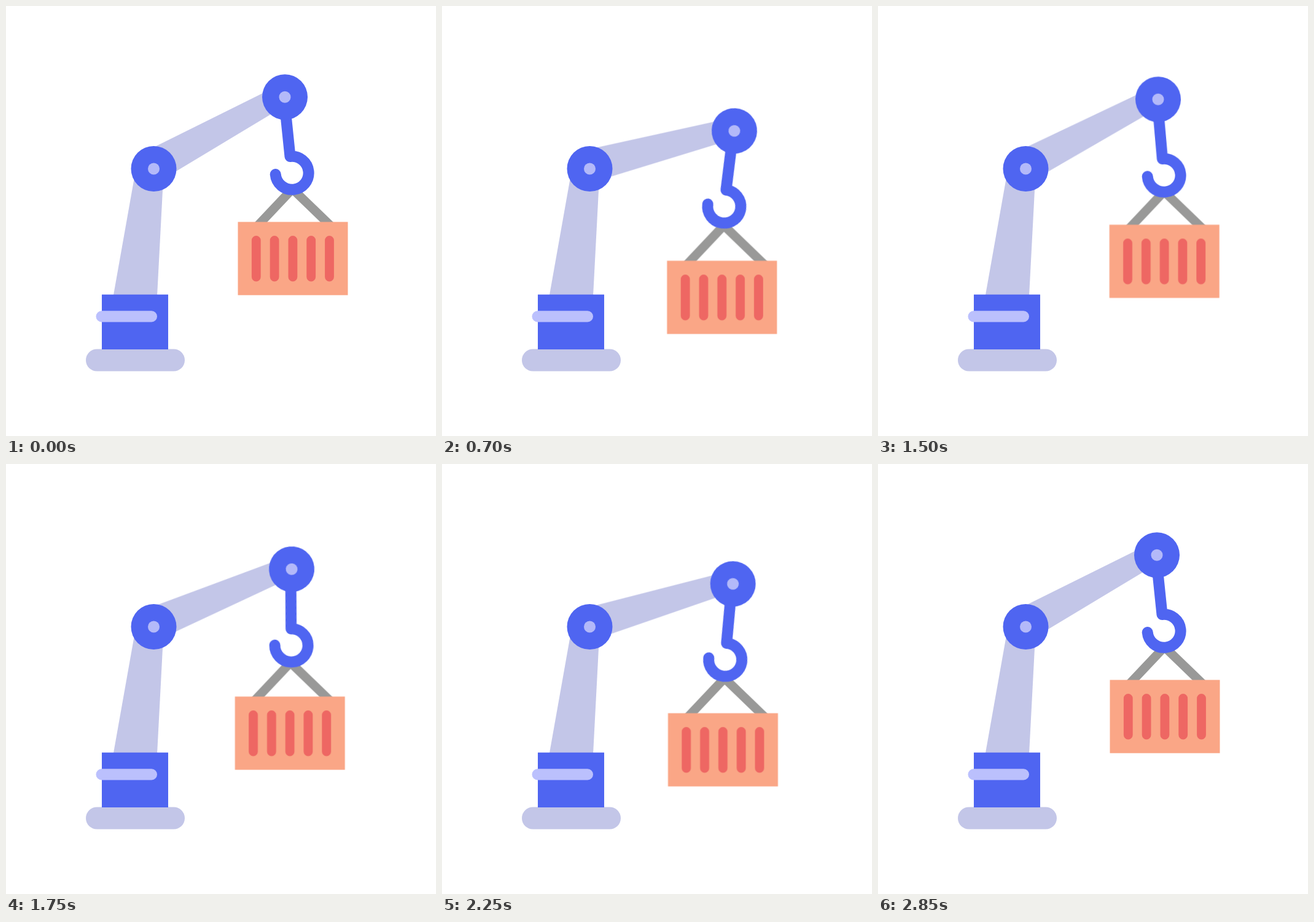
An HTML page without scripts that plays this animation: 700x700 px, repeating every 2.9 s.

```html
<!DOCTYPE html>
<html lang="en">
<head>
<meta charset="utf-8">
<title>Crane arm lifting a container</title>
<style>
  html, body {
    margin: 0;
    width: 100%;
    height: 100%;
    overflow: hidden;
    background: #fff;
  }
  svg { display: block; width: 100%; height: 100%; }

  .blue { fill: #4f65f1; }
  .pale { fill: #c3c6e8; }
  .dot { fill: #b3b9f9; }

  /* Lowered at 700 and 2150 ms, raised at 0, 1450 and 2850 ms, in 50 ms ticks */
  .arm, .hook, .straps, .box {
    animation: 2900ms -2ms infinite steps(14);
  }
  .arm {
    --low: rotate(14deg);
    transform-origin: 240.5px 265px;
    animation-name: sway;
  }
  .hook {
    --low: rotate(-1deg);
    transform-origin: 454px 148.2px;
    animation-name: sway;
  }
  .straps {
    --low: translate(-7.5px, 59.5px);
    animation-name: sway;
  }
  .box {
    --low: translate(-11.2px, 63.2px);
    animation-name: sway;
  }
  .arm, .hook { --rest: rotate(0deg); }
  .straps, .box { --rest: translate(0px, 0px); }

  @keyframes sway {
    0% { transform: var(--rest); }
    24.1379% { transform: var(--low); animation-timing-function: steps(15); }
    50% { transform: var(--rest); }
    74.1379% { transform: var(--low); }
    98.2759%, 100% { transform: var(--rest); }
  }
</style>
</head>
<body>
<svg viewBox="0 0 700 700">
  <path class="straps" d="M402.3 365.5 L466.3 297.7 L536.5 365.5"
        fill="none" stroke="#999998" stroke-width="14.5" stroke-linejoin="bevel"/>

  <g class="box">
    <rect x="377.5" y="351.5" width="179" height="119.2" fill="#faa686"/>
    <path d="M407.3 381.4v59.6 m29.8 -59.6v59.6 m29.8 -59.6v59.6 m29.8 -59.6v59.6 m29.8 -59.6v59.6"
          fill="none" stroke="#ee6763" stroke-width="14.8" stroke-linecap="round"/>
  </g>

  <path class="pale" d="M212 262 L257 262 L246 472 H174.7Z"/>

  <g class="arm">
    <path class="pale" d="M243 228.8 L444 129 L454 162.6 L240.5 291Z"/>
    <g class="hook">
      <path d="M453 153 L462.5 245 A27 27 0 1 1 438.7 274"
            fill="none" stroke="#4f65f1" stroke-width="18"
            stroke-linecap="round" stroke-linejoin="round"/>
    </g>
    <circle class="blue" cx="454" cy="148.2" r="37"/>
    <circle class="dot" cx="454" cy="148.2" r="9.5"/>
  </g>

  <circle class="blue" cx="240.5" cy="265" r="37"/>
  <circle class="dot" cx="240.5" cy="265" r="9.5"/>

  <rect class="pale" x="130" y="558.5" width="161" height="36" rx="18"/>
  <rect class="blue" x="156" y="469.7" width="108" height="89.3"/>
  <rect x="146.5" y="496.3" width="99.5" height="18.2" rx="9.1" fill="#bbc0fd"/>
</svg>
</body>
</html>
```
